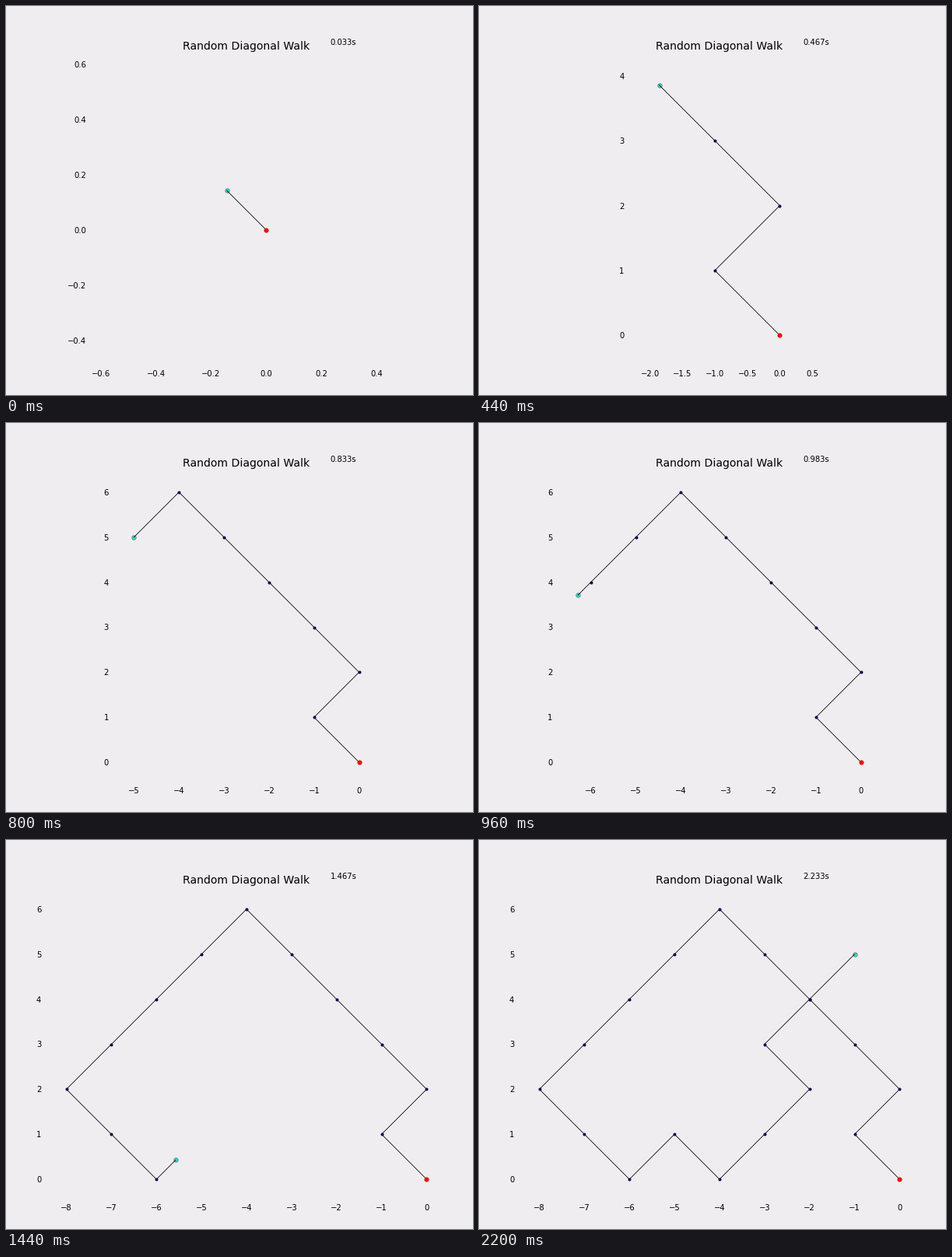
Recreate the animation shown at these times as a matplotlib script. Size 600 px wide and 500 px high, loop 2240 ms.

```python
import matplotlib.pyplot as plt
import numpy as np
from matplotlib.animation import FuncAnimation

FRAMES, INTERVAL = 56, 40
SUBSTEPS = 7          # ticks of the 60 Hz clock per diagonal step
MARGIN = 0.5
BACK = "#efedef"

# Direction of every diagonal step
DX = [-1, 1, -1, -1, -1, -1, -1, -1, -1, -1, 1, 1, 1, -1 + 2, 1, 1, -1, 1, 1]
DY = [1, 1, 1, 1, 1, 1, -1, -1, -1, -1, -1, -1, 1, -1, 1, 1, 1, 1, 1]
walk = np.vstack([(0, 0), np.cumsum(np.column_stack([DX, DY]), axis=0)])

fig = plt.figure(figsize=(600 / 72, 500 / 72), dpi=72, facecolor=BACK)
ax = fig.add_axes([0.05, 0.07, 0.93, 0.81], facecolor=BACK)
ax.set_aspect("equal", adjustable="box")
ax.tick_params(length=0, labelsize=10)
ax.spines[:].set_visible(False)

fig.text(0.515, 1 - 56 / 500, "Random Diagonal Walk", size=14, ha="center")
clock = fig.text(416.5 / 600, 0.9, "", size=10)

path, = ax.plot([], [], color="black", lw=0.8, zorder=2)
joints, = ax.plot([], [], "o", color="#0a0050", ms=4, mew=0, zorder=3)
ax.plot(0, 0, "o", mfc="#f01008", mec="#b03028", ms=5.5, mew=0.6, zorder=3)
head, = ax.plot([], [], "o", mfc="#18e0d4", mec="#8c7878", ms=5.5, mew=0.8,
                zorder=1)


def update(frame):
    tick = frame * 12 // 5 + 1        # 60 Hz clock shown at 25 fps
    done, part = divmod(tick, SUBSTEPS)
    tip = walk[done].astype(float)
    if part:
        tip += (walk[done + 1] - walk[done]) * part / SUBSTEPS
        last = done + 1
    else:
        last = done
    trail = np.vstack([walk[:last], tip])

    path.set_data(trail.T)
    joints.set_data(walk[1:last].T)
    head.set_data(tip[:1], tip[1:])
    low, high = trail.min(axis=0) - MARGIN, trail.max(axis=0) + MARGIN
    ax.set_xlim(low[0], high[0])
    ax.set_ylim(low[1], high[1])
    clock.set_text(f"{(tick + 1) / 60:.3f}s")
    return path, joints, head, clock


anim = FuncAnimation(fig, update, frames=FRAMES, interval=INTERVAL,
                     repeat=True, repeat_delay=0, blit=False)
plt.show()
```
